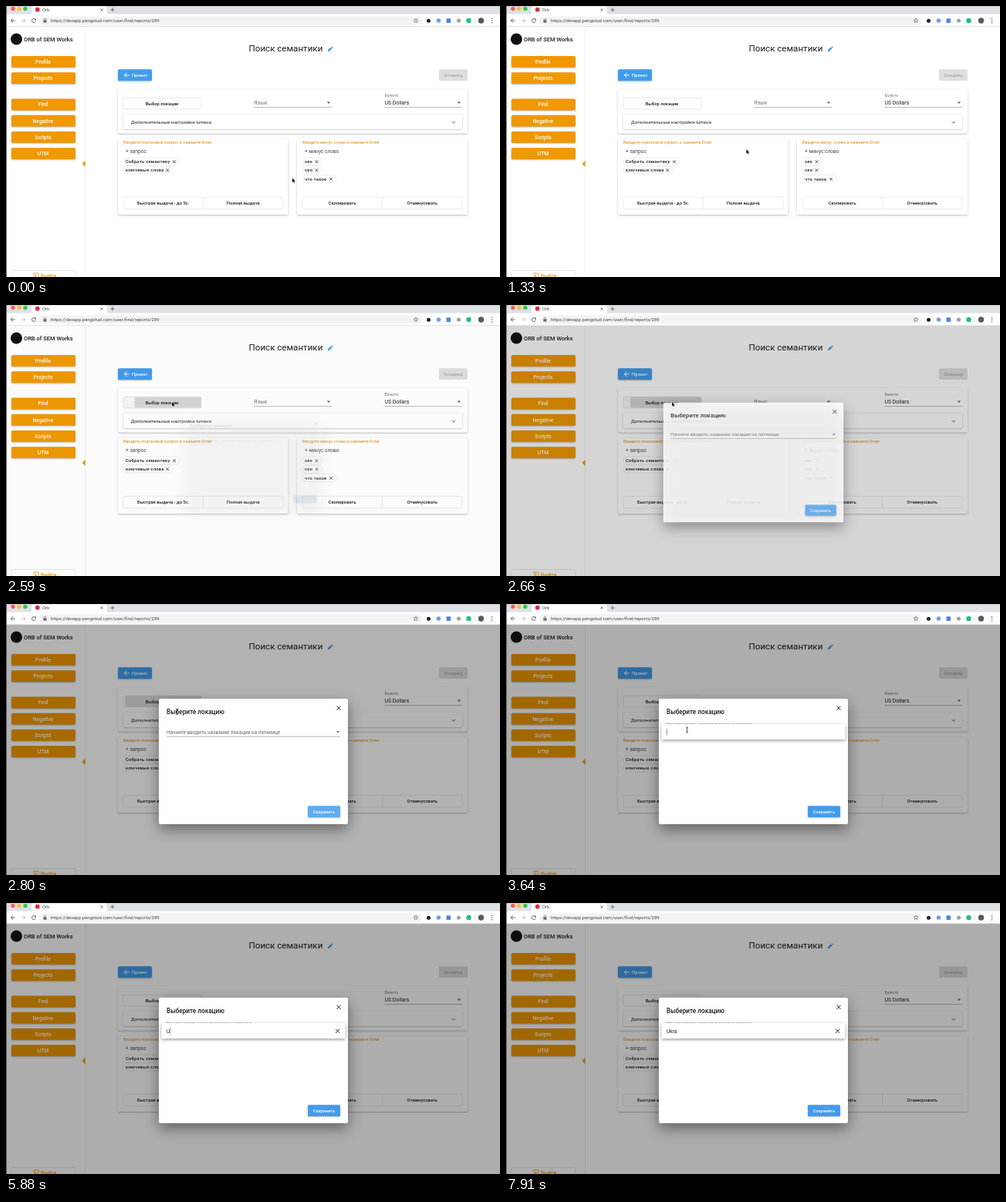
Animation of 640 by 352 pixels, one loop 8 s. Source, as an HTML page with a canvas:

```html
<!DOCTYPE html>
<html lang="ru">
<head>
<meta charset="utf-8">
<title>Orb</title>
<style>
html, body { margin: 0; width: 100%; height: 100%; overflow: hidden; background: #fff; }
canvas { display: block; width: 640px; height: 352px; }
</style>
</head>
<body>
<canvas id="stage"></canvas>
<script>
const W = 640, H = 352, LOOP = 8000;
const ORANGE = '#f09800', BLUE = '#429cec', INK = '#1c1c1c', GREY = '#757575';
const canvas = document.getElementById('stage');
const dpr = window.devicePixelRatio || 1;
canvas.width = W * dpr;
canvas.height = H * dpr;
const c = canvas.getContext('2d');

const clamp = v => Math.max(0, Math.min(1, v));
const span = (t, from, to) => clamp((t - from) / (to - from));
const easeOut = p => 1 - (1 - p) ** 3;
const smooth = p => p * p * (3 - 2 * p);

// Interpolates rows of [time, ...values].
function track(t, rows, ease = p => p) {
  const last = rows[rows.length - 1];
  if (t <= rows[0][0]) return rows[0].slice(1);
  if (t >= last[0]) return last.slice(1);
  const i = rows.findIndex(r => r[0] > t);
  const a = rows[i - 1], b = rows[i];
  const p = ease(span(t, a[0], b[0]));
  return a.slice(1).map((v, k) => v + (b[k + 1] - v) * p);
}

// y is the middle of the capital letters.
function text(str, x, y, size, color = INK, { weight = 400, align = 'left', gap = 0 } = {}) {
  c.font = `${weight} ${size}px Roboto, sans-serif`;
  c.letterSpacing = gap + 'px';
  c.textAlign = align;
  c.fillStyle = color;
  c.fillText(str, x, y + size * 0.355);
}

const label = (str, x, y, size, color) => text(str, x, y, size, color, { weight: 500, align: 'center' });

function rect(x, y, w, h, color) {
  c.fillStyle = color;
  c.fillRect(x, y, w, h);
}

function roundPath(x, y, w, h, r) {
  c.beginPath();
  c.roundRect(x, y, w, h, r);
}

function box(x, y, w, h, r, color, shadow) {
  c.save();
  if (shadow) {
    c.shadowColor = `rgba(0,0,0,${shadow[2]})`;
    c.shadowOffsetY = shadow[0] * dpr;
    c.shadowBlur = shadow[1] * dpr;
  }
  c.fillStyle = color;
  roundPath(x, y, w, h, r);
  c.fill();
  c.restore();
}

function outline(x, y, w, h, r, color) {
  c.strokeStyle = color;
  c.lineWidth = 0.7;
  roundPath(x, y, w, h, r);
  c.stroke();
}

function dot(x, y, r, color) {
  c.fillStyle = color;
  c.beginPath();
  c.arc(x, y, r, 0, Math.PI * 2);
  c.fill();
}

function line(points, color, width = 1) {
  c.strokeStyle = color;
  c.lineWidth = width;
  c.beginPath();
  points.forEach(([x, y], i) => i ? c.lineTo(x, y) : c.moveTo(x, y));
  c.stroke();
}

function shape(points, color) {
  c.fillStyle = color;
  c.beginPath();
  points.forEach(([x, y]) => c.lineTo(x, y));
  c.closePath();
  c.fill();
}

function cross(x, y, r, color = INK, width = 0.9) {
  line([[x - r, y - r], [x + r, y + r]], color, width);
  line([[x - r, y + r], [x + r, y - r]], color, width);
}

function arrow(x, y, r, dir, color, width = 0.9) {
  line([[x - r * dir, y], [x + r * dir, y]], color, width);
  line([[x, y - r], [x + r * dir, y], [x, y + r]], color, width);
}

const caretDown = (x, y) => shape([[x - 2.3, y - 1], [x + 2.3, y - 1], [x, y + 1.3]], '#666');

function browser() {
  rect(0, 0, W, 11, '#dee1e6');
  rect(0, 0, W, 0.6, '#b9bcc0');
  ['#fc5b57', '#fdbc2e', '#28c840'].forEach((color, i) => dot(9 + i * 8, 3.6, 2.7, color));
  box(33, 0.6, 98, 12, [3, 3, 0, 0], '#fff');
  rect(0, 10.5, W, 16.5, '#fff');
  dot(40.8, 4.7, 2.9, '#d9303e');
  text('Orb', 47, 5, 5.8, '#444');
  cross(124, 5, 1.6, '#555', 0.7);
  line([[135.5, 5], [140.5, 5]], '#555', 0.8);
  line([[138, 2.5], [138, 7.5]], '#555', 0.8);

  arrow(9, 19, 2.7, -1, '#555');
  arrow(22.5, 19, 2.7, 1, '#c0c0c0');
  c.strokeStyle = '#555';
  c.lineWidth = 0.9;
  c.beginPath();
  c.arc(36, 19, 2.5, 0.3, 5.5);
  c.stroke();
  shape([[36.5, 18.5], [39, 18.5], [39, 16]], '#555');

  box(43, 13.5, 496, 11, 5.5, '#f1f3f4');
  rect(48.5, 18.4, 4, 3.2, '#666');
  outline(49.3, 16.4, 2.4, 3, 1, '#666');
  text('https://devapp.pengstud.com/user/find/reports/289', 58, 19.2, 6.05, '#444');
  const star = [...Array(10).keys()].map(i => {
    const a = i * Math.PI / 5 - Math.PI / 2, r = i % 2 ? 1.3 : 3;
    return [531 + r * Math.cos(a), 19 + r * Math.sin(a)];
  });
  line([...star, star[0]], '#555', 0.6);
  dot(547.5, 19.3, 2.5, '#222');
  dot(560.5, 19, 2.8, '#6f9fe8');
  rect(570.5, 16.3, 5.6, 5.6, '#4d83dd');
  dot(586.5, 19, 2.6, '#a2a2a2');
  dot(599.5, 19, 3.2, '#1dbf83');
  line([[607.5, 15], [607.5, 23]], '#ddd', 0.7);
  dot(615.5, 19, 3.7, '#555b60');
  [16.2, 19, 21.8].forEach(y => dot(629.5, y, 0.7, '#555'));
  rect(0, 26.4, W, 0.7, '#d5d5d5');
}

function sidebar() {
  rect(102.3, 27, 0.8, H, '#ececec');
  dot(13.5, 43, 7.5, '#111');
  text('ORB of SEM Works', 23, 43, 7.5, INK, { weight: 500 });
  const items = [['Profile', 65], ['Projects', 86.3], ['Find', 120.6],
    ['Negative', 141.8], ['Scripts', 163], ['UTM', 184.2]];
  for (const [name, y] of items) {
    box(7, y, 83, 14.8, 1.5, ORANGE, [0.8, 2, 0.3]);
    label(name, 48, y + 7.4, 6.8, '#fff');
  }
  shape([[98.7, 205], [102.6, 200.8], [102.6, 209.2]], ORANGE);
  outline(7, 343.5, 83, 15, 1.5, '#ddd');
  line([[36, 349], [36, 347], [42, 347], [42, 354], [36, 354]], ORANGE, 0.8);
  arrow(37.5, 350.5, 2, 1, ORANGE, 0.8);
  text('Выйти', 45, 350.7, 6.6, ORANGE, { weight: 500 });
}

function chip(str, y, x, closeX) {
  outline(x - 3, y - 5, closeX - x + 10, 10, 5, '#e6e6e6');
  text(str, x, y, 5.8, INK, { weight: 500, gap: 0.25 });
  cross(closeX, y + 0.3, 1.9, '#222', 0.8);
}

function buttonPair(x, left, right) {
  outline(x, 248.3, 207, 15.5, 1, '#e2e2e2');
  line([[x + 103.5, 248.3], [x + 103.5, 263.8]], '#e2e2e2', 0.7);
  label(left, x + 51.7, 256, 5.8);
  label(right, x + 155.3, 256, 5.8);
}

function locationButton(t, x, y) {
  const hover = x > 152 && x < 253 && y > 119 && y < 134;
  box(152, 119.3, 101, 14.5, 1, hover ? '#f5f5f5' : '#fff');
  if (t > 2380 && t < 3000) {
    const [r] = track(t, [[2380, 0], [2520, 43], [2660, 54], [2800, 61]]);
    c.save();
    roundPath(152, 119.3, 101, 14.5, 1);
    c.clip();
    dot(215, 127, r, `rgba(0,0,0,${0.13 * (1 - span(t, 2800, 3000))})`);
    c.restore();
  }
  outline(152, 119.3, 101, 14.5, 1, '#e0e0e0');
  label('Выбор локации', 202, 126.8, 5.8);
}

function content(t, x, y) {
  text('Поиск семантики', 314.5, 55, 11.6, INK);
  shape([[417, 59], [417, 57.3], [420.8, 53.5], [422.5, 55.2], [418.7, 59]], BLUE);
  shape([[421.3, 53], [422.2, 52.2], [423.8, 53.8], [423, 54.7]], BLUE);

  box(145, 82.3, 44, 14.8, 1.5, BLUE, [0.8, 2, 0.3]);
  arrow(156.5, 89.8, 3.2, -1, '#fff', 1);
  text('Проект', 163, 89.8, 6, '#fff', { weight: 500 });
  box(561, 82.3, 37, 14.8, 1.5, '#dedede');
  label('Grouping', 579.5, 89.8, 5.9, '#a6a6a6');

  const lift = [1, 2.5, 0.26];
  box(145, 108, 453, 57.5, 1.5, '#fff', lift);
  box(145, 172.5, 220.5, 98.5, 1.5, '#fff', lift);
  box(377, 172.5, 221, 98.5, 1.5, '#fff', lift);

  locationButton(t, x, y);
  text('Язык', 321, 125.7, 7.2, GREY);
  text('Валюта', 490.5, 116.3, 4.9, GREY);
  text('US Dollars', 490.5, 125.8, 6.9);
  caretDown(418, 125.6);
  caretDown(587, 125.6);
  rect(321, 131.4, 101, 0.7, '#999');
  rect(490.5, 131.4, 100.5, 0.7, '#999');

  box(152, 140.5, 439, 19.5, 1, '#fff', [0.6, 2, 0.3]);
  text('Дополнительные настройки lumeva', 162, 150.3, 6.2);
  line([[577.6, 150], [579.8, 152.3], [582, 150]], '#555', 0.9);

  text('Введите поисковой запрос и нажмите Enter', 152, 177.3, 5.6, '#dc8c0c');
  text('Введите минус слово и нажмите Enter', 384, 177.3, 5.6, '#dc8c0c');
  text('+ запрос', 155, 188.7, 6.6, '#4a4a4a');
  text('+ минус слово', 387, 188.7, 6.6, '#4a4a4a');
  chip('Собрать семантику', 202, 155, 218);
  chip('ключевые слова', 213, 155, 209.3);
  chip('seo', 202, 387, 402.5);
  chip('сео', 213, 387, 402.5);
  chip('что такое', 224.5, 387, 421);
  buttonPair(152, 'Быстрая выдача - до 5с.', 'Полная выдача');
  buttonPair(384, 'Скопировать', 'Отминусовать');
}

const HINT = 'Начните вводить название локации на латинице';
const KEYS = [[5800, 'U'], [6300, 'Uk'], [6800, 'Ukr'], [7300, 'Ukra']];

function searchField(t) {
  const open = span(t, 3430, 3530);
  if (!open) {
    text(HINT, 208, 166.4, 6.4, '#666');
    caretDown(430, 166.3);
    rect(208, 171.8, 225, 0.7, '#999');
    return;
  }
  text(HINT, 208, 156.6, 4.8, '#888');
  c.save();
  c.globalAlpha *= open;
  box(201.5, 156, 238, 20, 1.5, '#fff', [1.5, 4, 0.4]);
  const typed = KEYS.filter(k => k[0] <= t).pop() || [3430, ''];
  text(typed[1], 208, 166.2, 6.7);
  if ((t - typed[0]) % 1000 < 500) {
    const x = 208 + (typed[1] ? c.measureText(typed[1]).width + 0.3 : 0);
    rect(x, 162, 0.6, 8.5, '#555');
  }
  if (typed[1]) cross(429.7, 166.3, 2.6, '#222', 1);
  c.restore();
}

function dialog(t) {
  if (t < 2585) return;
  rect(0, 27, W, H, `rgba(0,0,0,${0.32 * easeOut(span(t, 2585, 2935))})`);
  const p = easeOut(span(t, 2585, 2750));
  c.save();
  c.globalAlpha = p;
  c.translate(320.5, 204.5);
  c.scale(0.7 + 0.3 * p, 0.7 + 0.3 * p);
  c.translate(-320.5, -204.5);
  box(198, 123, 245, 163, 2, '#fff', [7, 18, 0.42]);
  text('Выберите локацию', 208, 140, 8.2, INK, { weight: 500 });
  cross(431, 135.3, 2.6, '#222', 1);
  searchField(t);
  box(391, 262.3, 42, 14.7, 1.5, t < 3430 ? '#5eacf0' : BLUE, [0.8, 2, 0.3]);
  label('Сохранить', 412, 269.8, 5.7, '#fff');
  c.restore();
}

function pointer(t, x, y) {
  if (t >= 5800) return;
  if (t >= 2730) {
    line([[x, y - 3], [x, y + 3]], '#222', 0.8);
    line([[x - 1.5, y - 3.4], [x + 1.5, y - 3.4]], '#222', 0.7);
    line([[x - 1.5, y + 3.4], [x + 1.5, y + 3.4]], '#222', 0.7);
    return;
  }
  const tip = [[0, 0], [0, 5.4], [1.2, 4.3], [2.1, 6.2], [3, 5.8], [2.2, 4], [3.8, 3.9]]
    .map(([dx, dy]) => [x + dx, y + dy]);
  line([...tip, tip[0]], '#fff', 1);
  shape(tip, '#000');
}

const PATH = [[700, 371, 223.5], [2200, 215, 126], [2680, 215, 126], [2800, 221.5, 140], [3300, 234.5, 163.5]];

function draw(t) {
  c.setTransform(dpr, 0, 0, dpr, 0, 0);
  rect(0, 0, W, H, '#fff');
  const [x, y] = track(t, PATH, smooth);
  sidebar();
  content(t, x, y);
  dialog(t);
  browser();
  rect(0, 0, 0.8, H, '#444');
  pointer(t, x, y);
}

const start = performance.now();
function frame() {
  draw((performance.now() - start) % LOOP);
  requestAnimationFrame(frame);
}
frame();
</script>
</body>
</html>
```
